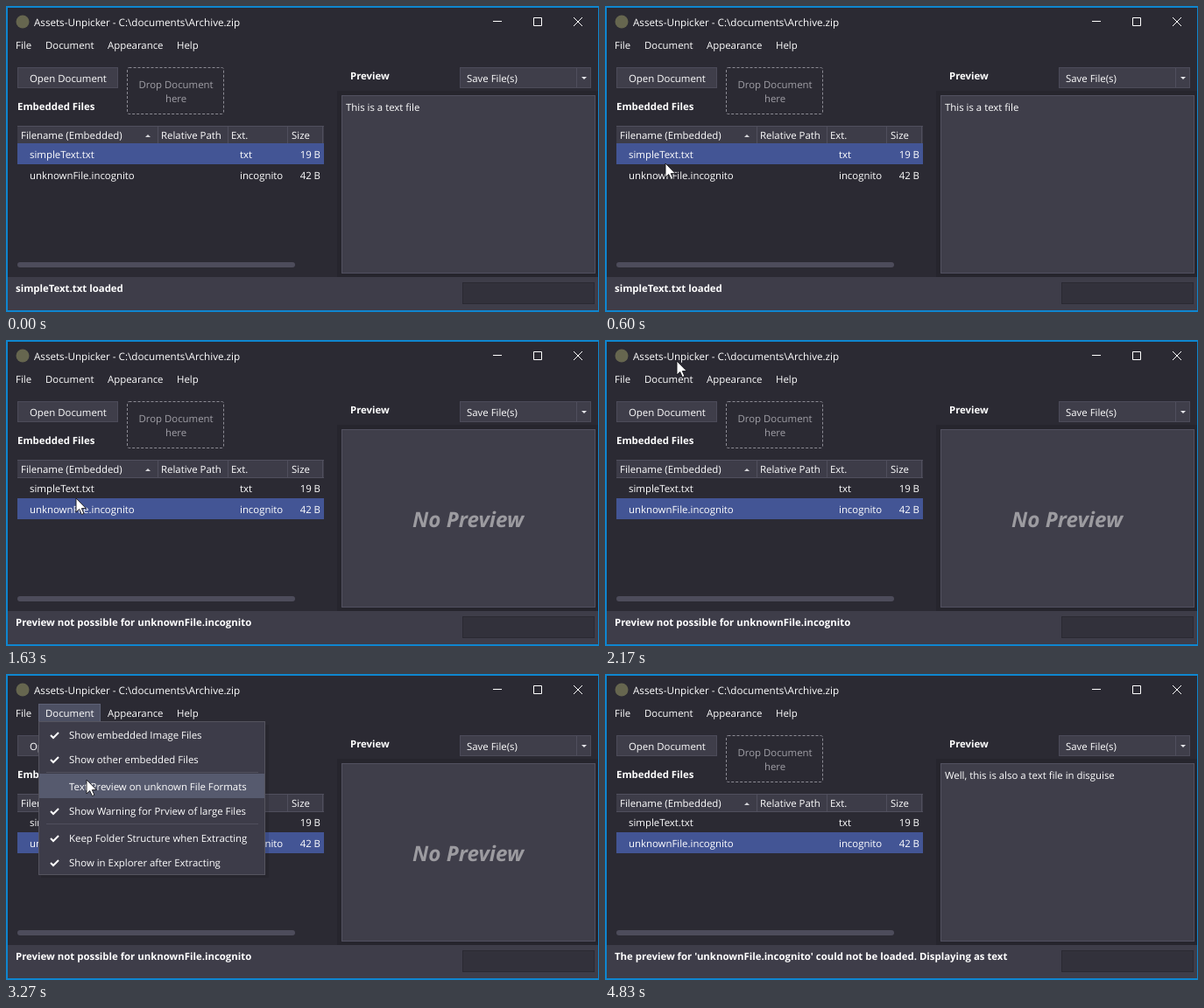
Animation of 677x350 px, one loop 5.68 s. Source, as an HTML page:

```html
<!DOCTYPE html>
<html lang="en">
<head>
<meta charset="utf-8">
<title>Archive preview</title>
<style>
  html, body { margin: 0; width: 100%; height: 100%; overflow: hidden; background: #2b2a33; }
  svg { display: block; }
  text {
    font: 11.4px "Open Sans", "Noto Sans", sans-serif;
    fill: #fff;
    text-rendering: geometricPrecision;
    white-space: pre;
  }
  .title { font-size: 11.65px; }
  .bold { font-weight: 700; }
  .dim { fill: #a09fa6; text-anchor: middle; }
  .end { text-anchor: end; }
  .empty { font: italic 700 24.2px "Open Sans", "Noto Sans", sans-serif; fill: #9c9ba0; }
  .button { fill: #3f3e4a; stroke: #4c4b59; }
  .panel { fill: #3f3e4a; stroke: #525160; }
  .panel.hover { stroke: #74738a; }
  .head { fill: #3d3c48; }
  .head.hover { fill: #4d4f60; }
  .line { stroke: #504f5d; fill: none; }
  .glyph { stroke: #fff; fill: none; }
  .check { stroke-width: 2; }
  .hot { fill: #565a6e; }
  #docBack { fill: #4d5063; stroke: #5d6075; }
  #docBack.hover { fill: #5a5d72; stroke: #a5a8bf; }
  .off { display: none; }
</style>
</head>
<body>
<svg id="stage" width="677" height="350" viewBox="0 0 677 350">
  <!-- window -->
  <rect width="677" height="350" fill="#0f86cf"/>
  <rect x="2" y="2" width="674" height="346" fill="#2b2a33"/>
  <circle cx="19" cy="18" r="7.5" fill="#66664f"/>
  <text class="title" x="32" y="23">Assets-Unpicker - C:\documents\Archive.zip</text>
  <path class="glyph" d="M556 17.5h10M602.5 13.5h9v9h-9zM648 13l10 10m0-10l-10 10"/>

  <!-- left side -->
  <rect class="button" x="13.5" y="70.5" width="114" height="23"/>
  <text x="27" y="87">Open Document</text>
  <rect x="138.5" y="70.5" width="110" height="53" rx="2" fill="none" stroke="#8c8b94" stroke-dasharray="3 2"/>
  <text class="dim" x="194" y="94">Drop Document</text>
  <text class="dim" x="194" y="110">here</text>
  <text class="bold" x="13" y="119">Embedded Files</text>

  <rect class="head" x="13" y="138" width="350" height="19"/>
  <rect class="head" id="nameHead" x="13" y="138" width="161" height="19"/>
  <path class="line" d="M13 137.5h350M13 157.5h350M173.5 138v19M253.5 138v19M321.5 138v19M361.5 138v19"/>
  <path d="M159 150l3-3 3 3z" fill="#d6d6da"/>
  <text x="17" y="152">Filename (Embedded)</text>
  <text x="177" y="152">Relative Path</text>
  <text x="257" y="152">Ext.</text>
  <text x="326" y="152">Size</text>

  <rect id="rowHover" x="13" y="181" width="350" height="24" fill="#3b3c49"/>
  <rect id="rowPick" x="13" width="350" height="24" fill="#435595"/>
  <text x="27" y="174">simpleText.txt</text>
  <text x="267" y="174">txt</text>
  <text class="end" x="359" y="174">19 B</text>
  <text x="27" y="198">unknownFile.incognito</text>
  <text x="267" y="198">incognito</text>
  <text class="end" x="359" y="198">42 B</text>
  <rect x="13" y="293" width="317" height="6" rx="3" fill="#4d4c5b"/>

  <!-- preview -->
  <rect x="378" y="97" width="298" height="213" fill="#26252d"/>
  <text class="bold" x="393" y="84">Preview</text>
  <rect class="button" x="518.5" y="70.5" width="149" height="23"/>
  <path class="line" d="M651.5 71v22"/>
  <path d="M657 81h6l-3 3z" fill="#e6e6ea"/>
  <text x="526" y="87">Save File(s)</text>
  <rect class="panel" id="panel" x="383.5" y="102.5" width="289" height="203"/>
  <text id="content" x="388" y="120"></text>
  <text class="empty" id="empty" x="464" y="214">No Preview</text>

  <!-- status bar -->
  <rect x="2" y="310" width="674" height="38" fill="#3e3d49"/>
  <text class="bold" id="status" x="11" y="327"></text>
  <rect x="521.5" y="316.5" width="150" height="24" fill="#32313b" stroke="#2a2932"/>

  <!-- menu bar and drop-down -->
  <rect id="docBack" x="37.5" y="34.5" width="70" height="20"/>
  <text x="11" y="49">File</text>
  <text x="45" y="49">Document</text>
  <text x="116" y="49">Appearance</text>
  <text x="195" y="49">Help</text>
  <g id="menu">
    <rect x="40" y="58" width="260" height="175" fill="#000" opacity=".1"/>
    <rect x="37.5" y="54.5" width="258" height="175" fill="#3d3c49" stroke="#55545f"/>
    <rect class="hot" id="hot" x="38" width="257" height="28"/>
    <path class="line" d="M46 112.5h242M46 171.5h242"/>
  </g>

  <path id="cursor" d="M0 0v16l3.7-3.5 2.7 6 2.5-1.1-2.6-5.8h5z" fill="#fff" stroke="#15151a" stroke-width=".9"/>
</svg>
<script>
const LOOP = 5680, TICK = 80;
const PICK = 1000, OPEN = 2490, CLOSE = 3420, AS_TEXT = 3580, LEAVE = 4830;
const $ = id => document.getElementById(id);
const show = (id, on) => $(id).classList.toggle('off', !on);
const hover = (id, on) => $(id).classList.toggle('hover', on);

const labels = [
  'Show embedded Image Files', 'Show other embedded Files',
  'Text Preview on unknown File Formats', 'Show Warning for Prview of large Files',
  'Keep Folder Structure when Extracting', 'Show in Explorer after Extracting'
];
const UNCHECKED = 2;
// Items come in pairs with a separator between them
const itemTop = i => 55 + 28 * i + 3 * Math.floor(i / 2);

function add(tag, attrs, text = '') {
  const el = document.createElementNS('http://www.w3.org/2000/svg', tag);
  for (const key in attrs) el.setAttribute(key, attrs[key]);
  el.textContent = text;
  $('menu').append(el);
}
labels.forEach((label, i) => {
  add('text', { x: 72, y: itemTop(i) + 19 }, label);
  if (i !== UNCHECKED) add('path', { class: 'glyph check', d: `M51 ${itemTop(i) + 15}l3 3 6-6` });
});

// Pointer glides: start, end, and the place reached; it rests in between
const entry = { x: 675, y: 376 };
const glides = [
  { from: 140, to: 460, x: 78, y: 189 },
  { from: 600, to: 600, x: 69, y: 180 },
  { from: 680, to: 760, x: 66, y: 186 },
  { from: 1000, to: 1150, x: 78, y: 182 },
  { from: 1630, to: 1630, x: 80, y: 181 },
  { from: 1700, to: 2170, x: 82, y: 24 },
  { from: 2330, to: 2570, x: 72, y: 40 },
  { from: 3030, to: 3270, x: 92, y: 121 },
  { from: 3420, to: 3900, x: 93, y: 127 },
  { from: 4040, to: 4360, x: 94, y: 123 },
  { from: 4510, to: 4750, x: 285, y: 266 }
];

function pointer(t) {
  let { x, y } = entry;
  for (const g of glides) {
    if (t < g.from) break;
    const steps = Math.round((g.to - g.from) / TICK) + 1;
    const p = t >= g.to ? 1 : Math.min(1, (Math.floor((t - g.from) / TICK) + 1) / steps);
    x += (g.x - x) * p;
    y += (g.y - y) * p;
  }
  return [Math.round(x), Math.round(y)];
}

function draw(t) {
  const [x, y] = pointer(t);
  const over = (l, top, r, b) => t < LEAVE && x >= l && x < r && y >= top && y < b;
  const second = t >= PICK, asText = t >= AS_TEXT, open = t >= OPEN && t < CLOSE;

  show('cursor', t < LEAVE);
  $('cursor').setAttribute('transform', `translate(${x} ${y})`);
  hover('panel', over(383, 102, 673, 306));
  hover('nameHead', !open && over(13, 138, 174, 157));
  show('rowHover', !second && over(13, 181, 363, 205));
  $('rowPick').setAttribute('y', second ? 181 : 157);

  const onDoc = over(37, 34, 108, 55);
  hover('docBack', onDoc);
  show('docBack', open || onDoc);
  show('menu', open);
  const item = labels.findIndex((_, i) => over(38, itemTop(i), 295, itemTop(i) + 28));
  show('hot', item >= 0);
  $('hot').setAttribute('y', itemTop(item));

  show('empty', second && !asText);
  $('content').textContent = asText ? 'Well, this is also a text file in disguise'
    : second ? '' : 'This is a text file';
  $('status').textContent = asText
    ? "The preview for 'unknownFile.incognito' could not be loaded. Displaying as text"
    : second ? 'Preview not possible for unknownFile.incognito' : 'simpleText.txt loaded';
}

const start = performance.now();
function tick() {
  draw((performance.now() - start) % LOOP);
  requestAnimationFrame(tick);
}
tick();
</script>
</body>
</html>
```
